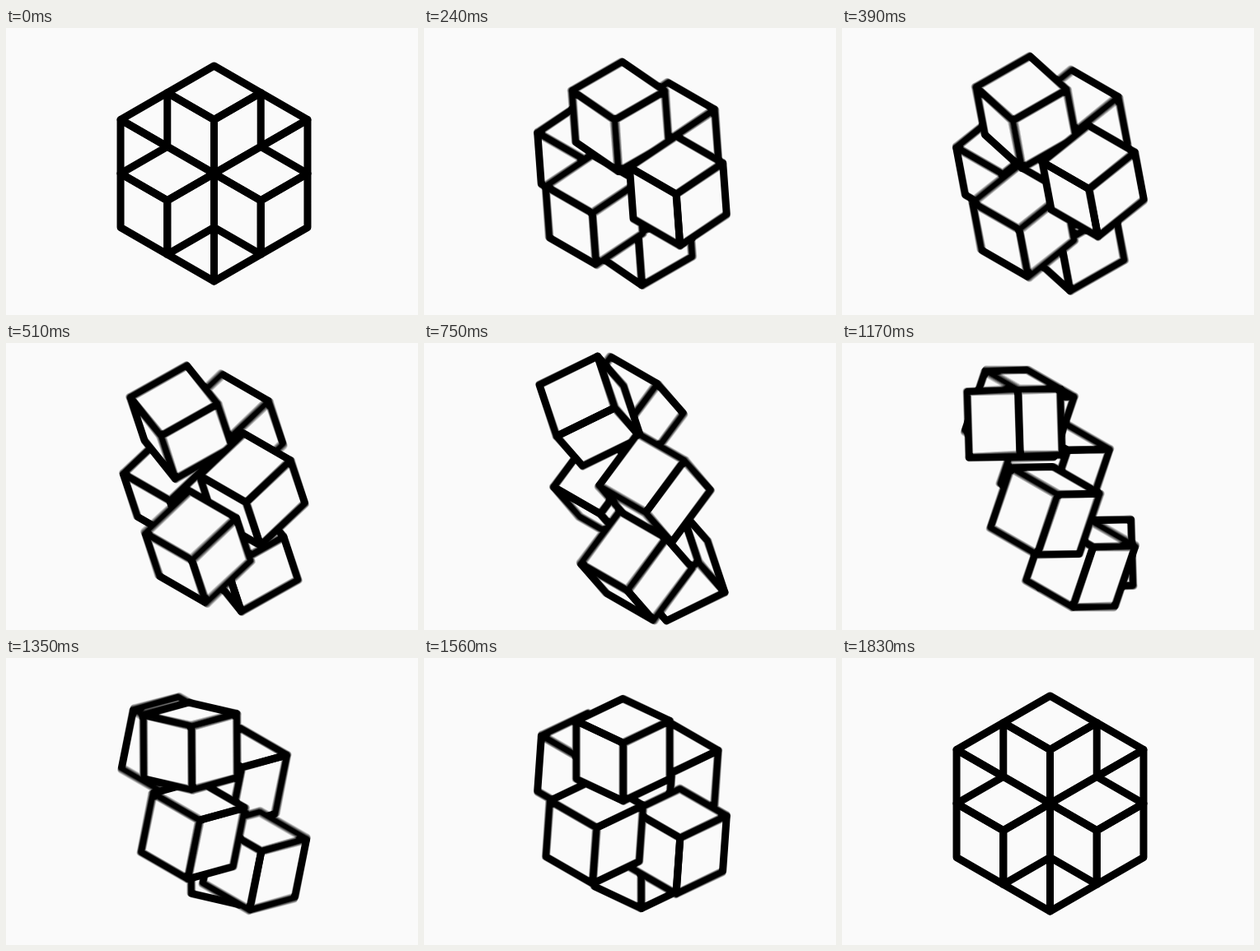
An HTML page with a canvas for the animation above (2730 ms loop, 500 by 349 pixels).

```html
<!DOCTYPE html>
<html lang="en">
<head>
<meta charset="utf-8">
<title>Sliding cubes</title>
<style>
html, body { margin: 0; height: 100%; overflow: hidden; background: #fafafa; }
canvas { display: block; }
</style>
</head>
<body>
<canvas id="stage" width="500" height="349"></canvas>
<script>
const STEP = 30, MOVING = 61, LOOP = 2730, SAMPLES = 6, SHUTTER = 0.8;
const EDGE = 65.5, HALF = EDGE * Math.sqrt(3) / 2;
const PAPER = '#fafafa', INK = '#000';

const stage = document.getElementById('stage');
const screen = stage.getContext('2d');
const layer = document.createElement('canvas');
layer.width = stage.width;
layer.height = stage.height;
const ctx = layer.getContext('2d');

const ease = p => p * p * (3 - 2 * p);
const dot = (a, b) => a[0] * b[0] + a[1] * b[1] + a[2] * b[2];
const mix = (a, m, b, n) => a.map((v, i) => v * m + b[i] * n);
const depth = v => v[0] + v[1] + v[2];   // seen along (1, 1, 1)
const project = ([x, y, z]) =>
  [252.5 + (y - x) * HALF, 177 + (x + y - 2 * z) * EDGE / 2];

function makeCubes(u) {
  const turn = ease(u) * Math.PI / 2, c = Math.cos(turn), s = Math.sin(turn);
  const x = [c, 0, -s], y = [0, 1, 0], z = [s, 0, c];
  const spun = [mix(x, c, y, -s), mix(y, c, x, s), z];
  const out = ease(Math.min(1, 2 * u)), back = 1 - ease(Math.max(0, 2 * u - 1));
  const pairs = [
    [mix(x, back, y, out), [x, y, z]],
    [mix(y, back, z, out), [x, y, z]],
    [mix(z, back, spun[1], -out), spun]
  ];
  return pairs.flatMap(([pos, axes]) =>
    [{ pos, axes }, { pos: pos.map(v => -v), axes }]);
}

// Decide by the axis along which two cubes are furthest apart.
function inFront(a, b) {
  const d = mix(a.pos, 1, b.pos, -1);
  const reach = (cube, n) =>
    cube.axes.reduce((sum, e) => sum + Math.abs(dot(e, n)) / 2, 0);
  let best = -Infinity, side = 0;
  for (const n of [...a.axes, ...b.axes]) {
    const along = dot(d, n);
    const gap = Math.abs(along) - reach(a, n) - reach(b, n);
    if (gap > best + 1e-6) {
      best = gap;
      side = along * depth(n);
    }
  }
  return side > 0;
}

function drawCube({ pos, axes }) {
  axes.forEach((n, i) => {
    const mid = mix(pos, 1, n, depth(n) > 0 ? 0.5 : -0.5);
    const p = axes[(i + 1) % 3], q = axes[(i + 2) % 3];
    ctx.beginPath();
    for (const [j, k] of [[-1, -1], [1, -1], [1, 1], [-1, 1]])
      ctx.lineTo(...project(mix(mix(mid, 1, p, j / 2), 1, q, k / 2)));
    ctx.closePath();
    ctx.fill();
  });
  axes.forEach((n, i) => {
    const mid = mix(pos, 1, n, depth(n) > 0 ? 0.5 : -0.5);
    const p = axes[(i + 1) % 3], q = axes[(i + 2) % 3];
    ctx.beginPath();
    for (const [j, k] of [[-1, -1], [1, -1], [1, 1], [-1, 1]])
      ctx.lineTo(...project(mix(mix(mid, 1, p, j / 2), 1, q, k / 2)));
    ctx.closePath();
    ctx.stroke();
  });
}

function drawScene(u) {
  ctx.fillStyle = PAPER;
  ctx.fillRect(0, 0, layer.width, layer.height);
  ctx.strokeStyle = INK;
  ctx.lineWidth = 9;
  ctx.lineJoin = 'round';
  const rest = makeCubes(u);
  while (rest.length) {
    const hides = rest.map(a => rest.filter(b => a !== b && inFront(a, b)).length);
    const next = hides.indexOf(Math.min(...hides));
    drawCube(rest.splice(next, 1)[0]);
  }
}

function frame(now) {
  const step = Math.floor((now % LOOP) / STEP);
  const moving = step > 0 && step < MOVING;
  // Average several moments for motion blur.
  for (let i = 0; i < (moving ? SAMPLES : 1); i++) {
    drawScene(moving ? (step + SHUTTER * i / (SAMPLES - 1)) / MOVING : 0);
    screen.globalAlpha = 1 / (i + 1);
    screen.drawImage(layer, 0, 0);
  }
  requestAnimationFrame(frame);
}

const start = performance.now();
const run = frame;
frame = () => run(performance.now() - start);
frame();
</script>
</body>
</html>
```
